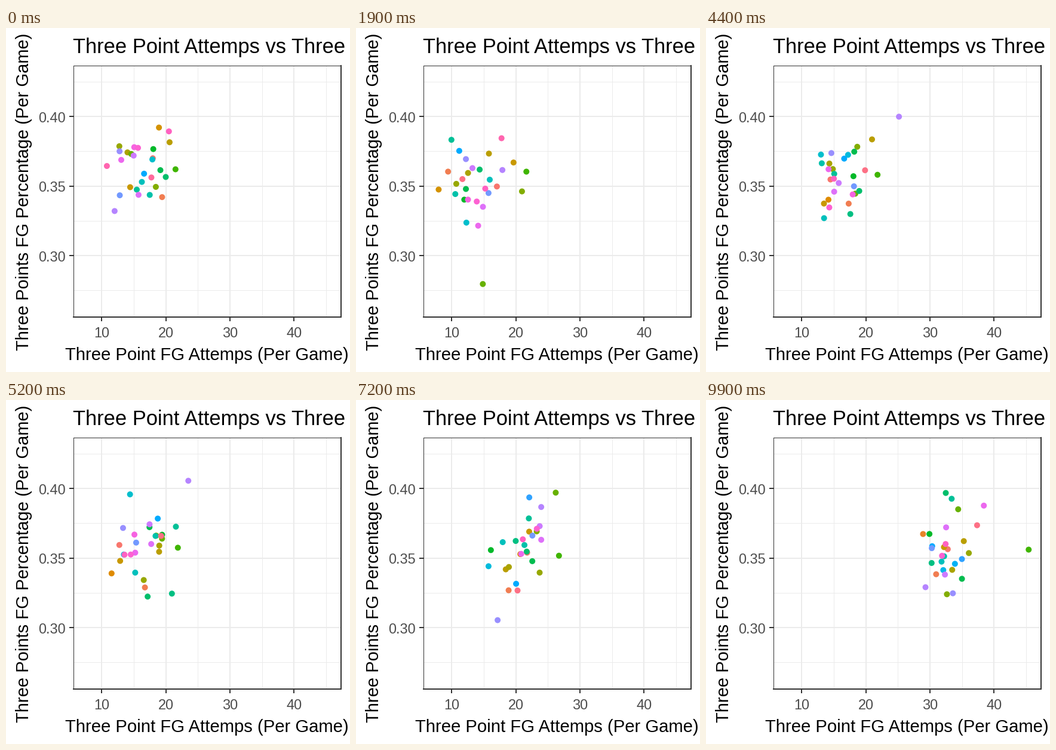
These frames come from a looping animation (576x576 px, 10000 ms). A matplotlib script:

```python
import numpy as np
import matplotlib.pyplot as plt
from matplotlib.animation import FuncAnimation

plt.rcParams["font.family"] = "Liberation Sans"

SIZE, FRAMES, TEAMS, LAST = 576, 100, 37, 23
LEFT, TOP, RIGHT, BOTTOM = 112.5, 63, 561, 484
SPREAD = (3.0, .018)

# First and last season of teams that were not there throughout
SPANS = {2: (17, 23), 3: (9, 18), 4: (0, 6), 15: (6, 23), 19: (0, 16),
         20: (7, 17), 21: (18, 23), 22: (19, 23), 24: (13, 23),
         31: (0, 12), 34: (0, 5), 35: (0, 1), 36: (2, 23)}

# Key points (season, attempts, percentage): the league average and three outliers
LEAGUE = [(0, 16.3, .366), (2.5, 12.9, .342), (5, 13.7, .354),
          (13, 18.1, .360), (16, 18.6, .353), (23, 32.0, .356)]
STARS = {
    10: [(0, 14.6, .373), (3, 14, .264), (13, 20, .375),
         (20, 31.6, .416), (23, 34.4, .385)],
    11: [(0, 21.5, .362), (13, 21.9, .357), (20, 30.9, .347), (23, 45.4, .356)],
    27: [(0, 12, .332), (10, 25.4, .399), (14, 21.6, .412), (23, 29.3, .329)],
}


def hcl(hue, chroma=100, lum=65):
    """Polar CIELUV colour as sRGB."""
    h = np.radians(hue)
    u = chroma * np.cos(h) / (13 * lum) + 0.19784
    v = chroma * np.sin(h) / (13 * lum) + 0.46834
    y = ((lum + 16) / 116) ** 3
    xyz = np.array([9 * u * y / (4 * v), y, y * (12 - 3 * u - 20 * v) / (4 * v)])
    rgb = np.clip(np.array([[3.2406, -1.5372, -0.4986],
                            [-0.9689, 1.8758, 0.0415],
                            [0.0557, -0.2040, 1.0570]]) @ xyz, 0, 1)
    return np.where(rgb > 0.0031308, 1.055 * rgb ** (1 / 2.4) - 0.055, 12.92 * rgb)


def path(points):
    """Attempts and percentage per season along straight lines."""
    when, *cols = np.transpose(points)
    return np.column_stack([np.interp(seasons, when, col) for col in cols])


def career(team):
    """A star's path, or a random walk that is pulled back to the league average."""
    if team in STARS:
        return path(STARS[team])
    steps = np.clip(rng.normal(size=(LAST + 1, 2)), -1.9, 1.9)
    for s in range(1, LAST + 1):
        steps[s] = 0.6 * steps[s - 1] + 0.8 * steps[s]
    return np.clip(path(LEAGUE) + steps * SPREAD, (7.5, .29), (39, .41))


rng = np.random.default_rng(23)
seasons = np.arange(LAST + 1)
keys = np.round(seasons * (FRAMES - 1) / LAST)
careers = [career(t) for t in range(TEAMS)]


def place(team, frame):
    start, end = SPANS.get(team, (0, LAST))
    if not keys[start] <= frame <= keys[end]:
        return [np.nan, np.nan]
    return [np.interp(frame, keys, col) for col in careers[team].T]


fig = plt.figure(figsize=(SIZE / 72, SIZE / 72), dpi=72, facecolor="white")
ax = fig.add_axes([LEFT / SIZE, 1 - BOTTOM / SIZE,
                   (RIGHT - LEFT) / SIZE, (BOTTOM - TOP) / SIZE])
ax.set(xlim=(5.536, 47.33), ylim=(.2558, .4365))
ax.set_xticks([10, 20, 30, 40], [])
ax.set_yticks([.30, .35, .40], [])
ax.set_xticks([15, 25, 35, 45], minor=True)
ax.set_yticks([.275, .325, .375, .425], minor=True)
ax.set_axisbelow(True)
ax.grid(which="minor", color="#EBEBEB", lw=1)
ax.grid(which="major", color="#EBEBEB", lw=2)
ax.tick_params(which="minor", length=0)
ax.tick_params(length=7, width=2, color="#333333")
for name, side in ax.spines.items():
    side.set(color="#333333", lw=1 if name in ("left", "top") else 2)

tick_text = dict(textcoords="offset points", fontsize=23.5, color="#4D4D4D",
                 va="baseline", annotation_clip=False)
for x in (10, 20, 30, 40):
    ax.annotate(str(x), (x, 0), (0, -33.5), ha="center",
                xycoords=("data", "axes fraction"), **tick_text)
for y in (.30, .35, .40):
    ax.annotate(f"{y:.2f}", (0, y), (-13, -9.8), ha="right",
                xycoords=("axes fraction", "data"), **tick_text)


def label(x, y, text, size, **kw):
    fig.text(x / SIZE, 1 - y / SIZE, text, fontsize=size, color="black",
             va="baseline", rotation_mode="anchor", **kw)


label(112, 42, "Three Point Attemps vs Three", 34.5)
label(336.8, 555.5, "Three Point FG Attemps (Per Game)", 29.3, ha="center")
label(38, 274, "Three Points FG Percentage (Per Game)", 29.1, ha="center",
      rotation=90)

dots = ax.scatter(np.zeros(TEAMS), np.zeros(TEAMS), s=10 ** 2, lw=0, zorder=2.4,
                  c=[hcl(15 + 360 * t / TEAMS) for t in range(TEAMS)])


def draw(frame):
    dots.set_offsets([place(t, frame) for t in range(TEAMS)])
    return [dots]


anim = FuncAnimation(fig, draw, frames=FRAMES, interval=100, repeat=True,
                     repeat_delay=0, blit=False)
plt.show()
```
